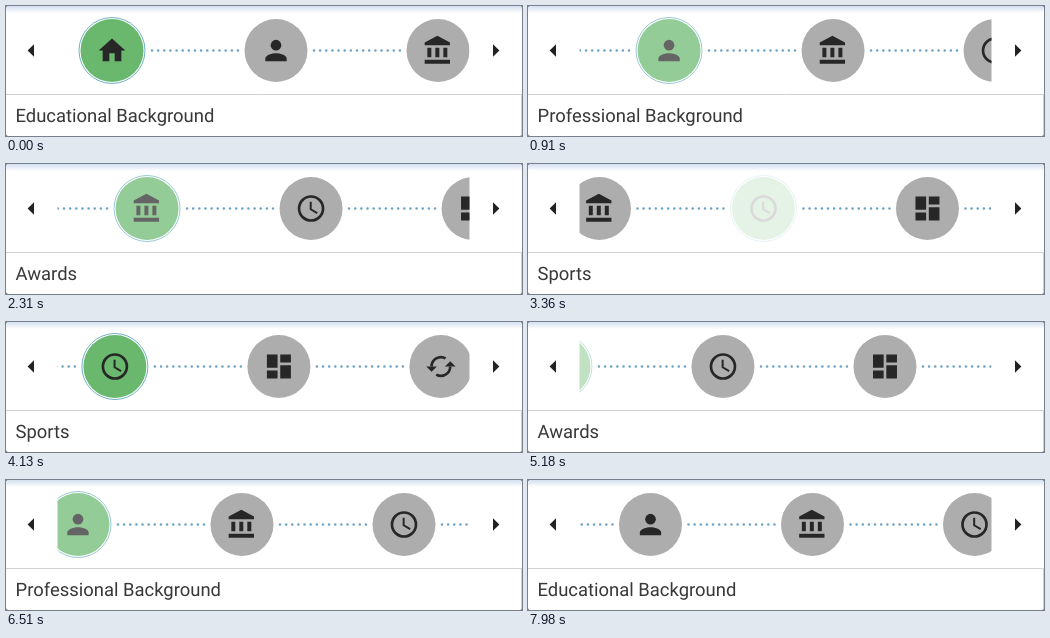
Recreate the animation shown at these times as an HTML page. Size 516 by 130 pixels, loop 8 s.

```html
<!DOCTYPE html>
<html lang="en">
<head>
<meta charset="utf-8">
<title>Timeline carousel</title>
<style>
html, body { margin: 0; width: 100%; height: 100%; overflow: hidden; background: #666; }
svg { display: block; width: 516px; height: 130px; }
text { font: 18.45px Roboto, sans-serif; fill: #383838; text-rendering: geometricPrecision; }
.dots { stroke: #6ea3c3; stroke-width: 2.6; stroke-linecap: round; stroke-dasharray: 0 6.14; }
.icon { fill: #272727; }
.line { fill: none; stroke: #272727; stroke-width: 2; }
.ring { fill: none; stroke: #6fb2c2; }
</style>
</head>
<body>
<svg viewBox="0 0 516 130">
  <defs>
    <linearGradient id="shade" x2="0" y2="1">
      <stop stop-color="#d3dff0"/><stop offset="1" stop-color="#fff"/>
    </linearGradient>
    <clipPath id="view"><path d="M51.5 0H463.5V88H51.5z"/></clipPath>
  </defs>
  <rect width="516" height="130" rx="2.5" fill="#fff"/>
  <rect width="516" height="7" rx="2.5" fill="url(#shade)"/>
  <path d="M0 88.5H515.5V129" fill="none" stroke="#d0d0d0"/>
  <path d="M28 38.2V50.8L21.6 44.5zM487 38.2V50.8L493.4 44.5z" fill="#222"/>
  <g id="strip" clip-path="url(#view)"></g>
  <text id="label" x="9.5" y="116"></text>
</svg>
<script>
const LOOP = 8000, SCROLL = 1150;
const PITCH = 162, LEFT = 72.5, MIDDLE = 44.5, SMALL = 63, LARGE = 67;
const LABELS = ['Educational Background', 'Professional Background', 'Awards', 'Sports'];
const ICONS = [
  '<path d="M10 20v-6h4v6h5v-8h3L12 3 2 12h3v8z"/>',
  '<circle cx="12" cy="8" r="4"/><path d="M12 14c-2.67 0-8 1.34-8 4v2h16v-2c0-2.66-5.33-4-8-4z"/>',
  '<path d="M4 10h3v7H4zM10 10h3v7h-3zM16 10h3v7h-3zM2 19h19v3H2zM11.5 1 2 6v2h19V6z"/>',
  '<circle class="line" cx="12" cy="12" r="9"/><path class="line" style="stroke-width:1.5" d="M11.75 7v5.6l4.9 2.9"/>',
  '<path d="M3 3h8v10H3zM3 15h8v6H3zM13 11h8v10h-8zM13 3h8v6h-8z"/>',
  '<path class="line" d="M19 12a7 7 0 0 1-10.5 6.06M5 12a7 7 0 0 1 10.5-6.06"/><path d="M19 8l-4 4h8zM5 16l-4-4h8z"/>'
];
// click time, scroll start, selected item
const STEPS = [
  [70, 357, 1], [1750, 1757, 2], [2870, 3180, 3],
  [4822, 4822, 2], [5670, 5950, 1], [7630, 7870, 0]
];

const strip = document.getElementById('strip');
const label = document.getElementById('label');
strip.innerHTML = ICONS.map(icon => `<g>
  <path class="dots" d="M0 0H87"/>
  <g><circle class="disc" r="31.5"/><circle class="ring" r="33"/>
  <g class="icon" transform="scale(1.333) translate(-12 -12)">${icon}</g></g></g>`).join('');
const items = [...strip.children].map(g => ({
  dots: g.children[0], body: g.children[1],
  disc: g.querySelector('.disc'), ring: g.querySelector('.ring')
}));

const clamp = x => Math.min(1, Math.max(0, x));
const smooth = x => x * x * (3 - 2 * x);
const bezier = (u, a, b) => 3 * u * (1 - u) * (1 - u) * a + 3 * u * u * (1 - u) * b + u * u * u;

// cubic-bezier(.25, .1, .25, 1)
function ease(x) {
  let lo = 0, hi = 1;
  for (let i = 0; i < 24; i++) {
    const mid = (lo + hi) / 2;
    if (bezier(mid, .25, .25) < x) lo = mid; else hi = mid;
  }
  return bezier(lo, .1, 1);
}

function draw(t) {
  let text = 0, active = 0, fade = 1, offset = 0, previous = 0;
  for (const [click, start, index] of STEPS) {
    if (t >= click) text = index;
    if (t >= Math.max(click, start - 140)) {
      active = index;
      fade = smooth(clamp((t - start + 70) / 970));
    }
    if (t >= start) {
      offset = PITCH * (previous + (index - previous) * ease(clamp((t - start) / SCROLL)));
    }
    previous = index;
  }
  label.textContent = LABELS[text];
  items.forEach(({ dots, body, disc, ring }, i) => {
    const on = i === active;
    const left = LEFT + PITCH * i - offset + (i > active ? LARGE - SMALL : 0);
    const width = on ? LARGE : SMALL;
    body.setAttribute('transform', `translate(${left + width / 2} ${MIDDLE})`);
    body.setAttribute('opacity', on ? fade : 1);
    disc.setAttribute('fill', on ? '#69b86d' : '#adadad');
    ring.setAttribute('visibility', on ? 'visible' : 'hidden');
    dots.setAttribute('transform', `translate(${left + width + 6.5} ${MIDDLE})`);
  });
}

function tick() {
  draw(performance.now() % LOOP);
  requestAnimationFrame(tick);
}
tick();
</script>
</body>
</html>
```
